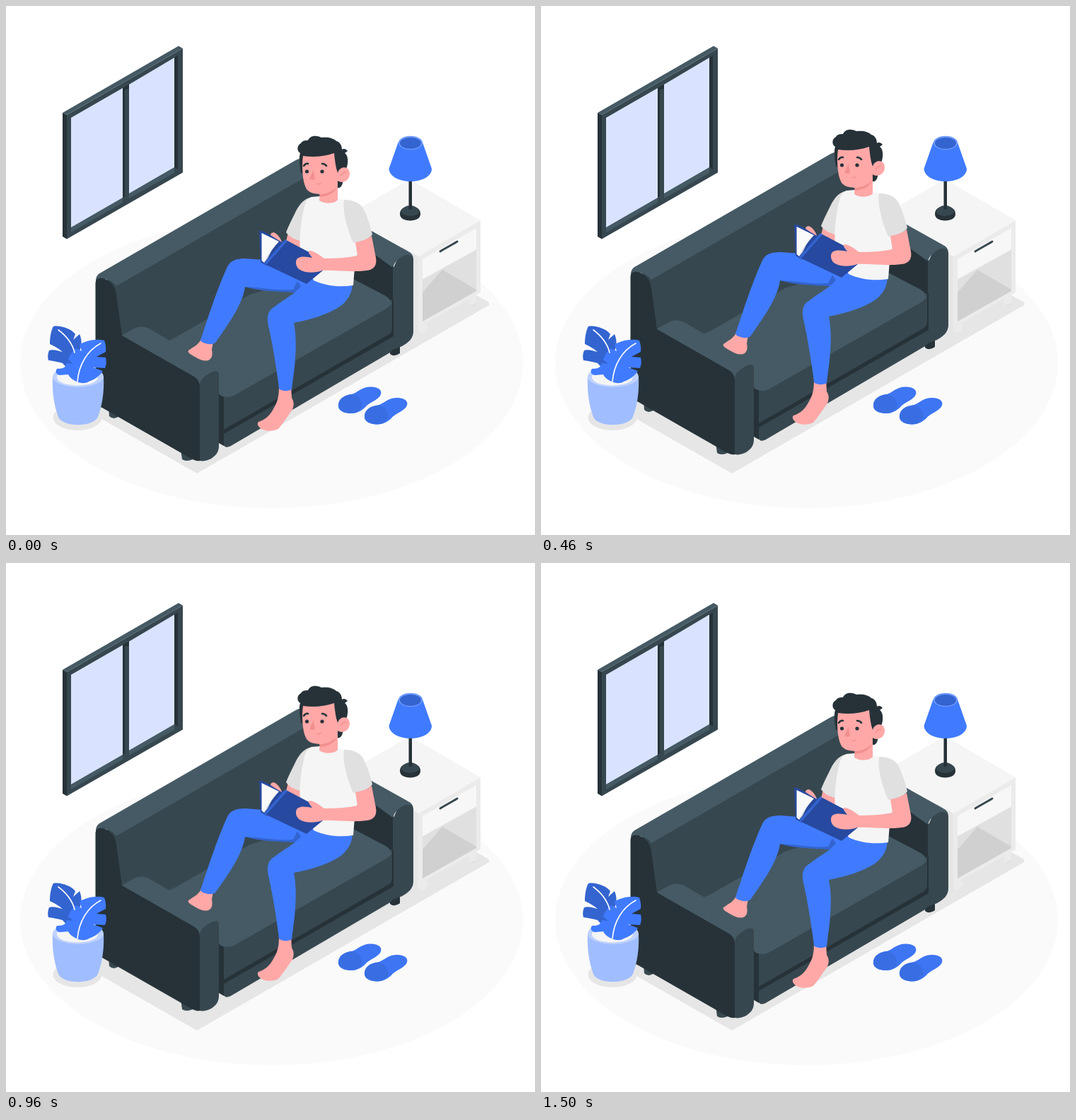
An HTML page for the animation above (1.54 s loop, 748 by 748 pixels).

```html
<!DOCTYPE html>
<html lang="en">
<head>
<meta charset="utf-8">
<title>Reading on the sofa</title>
<style>
  html, body { margin: 0; width: 100%; height: 100%; overflow: hidden; background: #fff; }
  svg { display: block; width: 100%; height: 100%; }
  .k { fill: #263238; } .d { fill: #37474f; } .l { fill: #455a64; }
  .b { fill: #407bff; } .n { fill: #3364d0; } .s { fill: #ffa8a7; }
  .g { fill: #e6e6e6; } .w { fill: #f5f5f5; }
  .line { fill: none; stroke-linecap: round; stroke-linejoin: round; }
</style>
</head>
<body>
<svg viewBox="0 0 748 748">
  <defs>
    <g id="slipper">
      <path fill="#3d75f2" d="M470 564C471 555 479 550 489 549C497 547 502 539 515 538.5C526 538 532 543 530 549C528 556 517 559 510 565C505 571 498 576 488 576C477 576 469 572 470 564Z"/>
      <path fill="#396ee3" d="M470 563C471 555 479 550 489 549C499 551 505 558 503 568C499 573 495 576 488 576C477 576 469 571 470 563Z"/>
    </g>
  </defs>

  <!-- floor and shadows -->
  <ellipse cx="375.5" cy="505" rx="355.5" ry="205" fill="#fafafa"/>
  <path class="g" d="M130 581L270 661L683 423V419L660 406L300 500L130 560Z"/>
  <ellipse class="g" cx="101" cy="582" rx="34.5" ry="18"/>

  <!-- window -->
  <path class="d" d="M86 154L250 60V235.500L86 329.500Z"/>
  <path class="l" d="M80 151L244 56.500L250 60L86 154Z"/>
  <path class="k" d="M80 151L86 154V329.500L80 326Z"/>
  <path class="l" d="M92 312L165 270V278L92 320ZM174 262L238 226V236L174 272Z"/>
  <path fill="#d9e3ff" d="M92 158L165 116V271L92 313ZM174 111L238 73V228L174 265Z"/>
  <path class="k" d="M238 73L243 70V231L238 228ZM165 116L168 114.500V269L165 271ZM168 114L174 111V117L168 118Z"/>

  <!-- nightstand -->
  <path fill="#e0e0e0" d="M655 409H665V422L660 425L655 422Z"/>
  <path class="g" d="M560 335L583 354V463L560 450Z"/>
  <path fill="#ebebeb" d="M583 354L671 303V405L583 455Z"/>
  <path fill="#ebebeb" d="M583 450H596V457L589 463L583 460ZM655 410L665 406V420L655 424Z"/>
  <path class="w" d="M483 296L571 245L671 303L583 354Z"/>
  <path fill="#f7f7f7" d="M589 358L665 314V344L589 386Z"/>
  <path fill="#e0e0e0" d="M589 387L665 345V403L589 446Z"/>
  <path fill="#d0d0d0" d="M617 373L665 401V403L589 446V405Z"/>
  <path class="line" stroke="#37474f" stroke-width="3" d="M614 347C615 346 637 334 638 333"/>

  <!-- lamp -->
  <path class="k" d="M557 294C557 287 563 283 571.500 283C580 283 586 287 586 294C586 300 580 303.500 571.500 303.500C563 303.500 557 300 557 294Z"/>
  <path class="d" d="M559 290C561 285 566 282 571.500 282C577 282 582 285 584 290C585 299 558 299 559 290Z"/>
  <path class="k" d="M569.500 240H574V287Q571.700 289 569.500 287Z"/>
  <path class="b" d="M554.500 193L541.500 230C542 241 556 248 572 248C588 248 602 241 602 230L589 193Z"/>
  <ellipse cx="572" cy="193.500" rx="17.200" ry="9.700" fill="#6f9bff"/>
  <ellipse class="n" cx="572" cy="194" rx="15" ry="8"/>

  <use href="#slipper"/>
  <use href="#slipper" x="37" y="15.500"/>

  <g id="float">
    <!-- sofa feet -->
    <path class="d" d="M145 566H160V580Q152 586 146 580ZM247 626H264V641Q255 645 249 641Z"/>
    <path class="k" d="M542 476H557V491Q549 497 543 492Z"/>

    <!-- backrest -->
    <path class="d" d="M140 389L425 226L462 240V400L232 474L160 470Z"/>
    <path class="l" d="M127 389C127 382 130 379 135 376.500L408 219C414 215 422 214 428 217L462 241H425L156 396C150 387 138 383 127 389Z"/>

    <!-- right arm -->
    <path class="k" d="M455 380L515 322L548 350V482L470 450Z"/>
    <path class="d" d="M547 486V372L556 352L570 348C574 350 576 354 576 359V460C576 470 569 476 560 481Z"/>
    <path class="l" d="M490 336L515 317L567 346C571 348 574 351 575 354C569 350 564 352 559 355C553 359 549 363 547 370L518 349L500 355Z"/>

    <!-- seat -->
    <path class="k" d="M301 540L548 415V478L308 622L301 618Z"/>
    <path class="d" d="M308 605L548 467V483Q547 487 543 490L318 622C312 625 308 624 308 619Z"/>
    <path class="d" d="M308 552L400 480L546 415V455Q546 461 542 464L308 599Z"/>
    <path class="l" d="M230 473L345 407L440 372L493 387L535 409C542 413 545 417 545 421Q542 426 534 430L322 551C312 555 303 552 301 548L296 512Z"/>
    <path class="d" d="M232 473L337 398H400L262 477L250 483Z"/>
    <path class="l" d="M232 473L345 408L420 385L420 430L290 520Z"/>

    <!-- left arm -->
    <path class="l" d="M163 466L181 456C189 452 197 453 204 457L296 511C300 513 302 517 301 521L276 540Z"/>
    <path class="k" d="M126.500 562V392C127 384 134 383 142 387C152 392 155 400 156 408L164 466L264 523C270 526 274 531 274 538V643C270 644 265 642 260 639L136 568C129 566 126.500 565 126.500 562Z"/>
    <path class="d" d="M274 643V536C274 529 280 524 288 519C296 515 301 515 301 521V622C301 631 296 637 288 641C283 643 278 644 274 643Z"/>

    <!-- far leg -->
    <path class="s" d="M276 470C274 478 265 482 258 487C256 490 262 493 267 496C275 501 284 504 289 499C292 496 292 491 291 486L293 474Z"/>
    <path class="b" d="M275 473C283 448 299 399 312 371C316 360 325 357 338 357L365 359L440 382V402C430 407 415 406 400 404C380 401 355 402 338 397C335 417 324 437 296 476C292 480 279 478 275 473Z"/>
    <path class="n" d="M338 397C362 398 386 403 406 401L412 389L418 398L408 405C385 404 357 403 338 397Z"/>

    <!-- near leg -->
    <path class="s" d="M386 537C386 549 385 558 379 568C374 578 367 585 357 588C354 591 357 596 363 599C371 602 379 601 385 598C393 589 400 577 405 571C407 565 408 561 404 554L403 537Z"/>
    <path class="b" d="M386 541C382 509 377 479 371 452C368 438 371 430 380 425C390 417 404 409 412 402L432 380L490 390C490 403 486 412 477 421C462 434 433 443 407 448C411 467 410 491 408 510L404 542C400 545 389 545 386 541Z"/>

    <!-- far arm and torso -->
    <path class="s" d="M399 320L420 328V347L396 333Z"/>
    <path fill="#e0e0e0" d="M436 270C423 270 415 280 410 290C404 302 399 312 396 320C401 327 410 331 419 333L430 300Z"/>
    <path class="w" d="M432 270L444 269Q456 276 469 272L486 276C500 310 502 338 493 370L491 395C472 398 452 396 435 388L416 345C414 322 419 294 423 280Q426 272 432 270Z"/>
    <path fill="#e0e0e0" d="M478 274C494 274 503 280 507 290C512 301 516 314 518 323C513 330 502 334 491 335C484 319 475 291 478 274Z"/>

    <!-- book -->
    <path fill="#27499f" d="M358 318L362 318L397 335L368 367L360 362Z"/>
    <path class="s" d="M374 324C374 320 379 319 382 322C386 325 389 330 390 334L380 328Z"/>
    <path fill="#fafafa" d="M361.500 321L386 333C378 341 371 352 365 363L361.500 360Z"/>
    <path fill="#e0e0e0" d="M386 333C379 340 371 352 365 363L370 357L378 341Z"/>
    <path class="n" d="M365 364L395 330L399 333L369 368Z"/>
    <path fill="#27499f" d="M368 366L398 332L436 352L448 374L425 393Z"/>

    <!-- near arm -->
    <path class="s" d="M494 334C503 333 512 329 517 325L523 356C525 367 520 373 510 374C488 377 466 373 447 374C437 378 423 378 414 372C409 367 409 360 412 357C418 353 426 355 433 356C430 352 426 348 429 346C436 346 444 353 450 357C466 357 482 356 497 353Z"/>

    <!-- head -->
    <path class="k" d="M417 236C415 225 414 214 416 208C411 205 411 197 417 194C419 190 424 190 427 190C430 183 438 182 446 186C456 185 463 187 467 191C472 192 475 197 475 203C477 201 481 202 483 205L479 208C485 212 484 225 480 233L476 250C475 255 472 258 469 257L450 250Z"/>
    <path class="s" d="M444 255L469 245V274C465 280 449 280 443 275Z"/>
    <path fill="#f28f8f" d="M444 266C455 265 463 261 468 256C465 264 456 269 444 270Z"/>
    <path class="s" d="M420 212C434 214 450 213 464 208C465 218 466 228 469 236C471 229 477 227 482 229C488 233 487 243 481 247C476 250 471 249 469 247C467 259 459 264 447 266C436 266 427 264 424 257C419 247 418 226 420 212Z"/>
    <path class="line" stroke="#f28f8f" stroke-width="1.300" d="M435 233C433 237 431 241 430 244Q433 246 436 244M440 251Q443 253 445 250M473 240Q476 235 481 235"/>
    <path fill="#f28f8f" d="M435 234L430 244Q434 247 437 244Z"/>
    <path class="line" stroke="#263238" stroke-width="2.500" d="M421 226Q424 222 427 223M447 223Q451 223 453 226"/>
    <circle class="k" cx="425.500" cy="234" r="2.600"/>
    <circle class="k" cx="447" cy="234" r="2.600"/>
  </g>

  <!-- plant -->
  <path fill="#a0bdff" d="M66 524C65 546 68 565 74 581C80 596 123 596 130 581C136 565 139 546 138 524Z"/>
  <ellipse cx="102" cy="524" rx="36" ry="15" fill="#bfd2ff"/>
  <ellipse cx="101" cy="525" rx="29" ry="11.500" fill="#f5f5f5"/>
  <path class="n" d="M67 453C77 451 93 457 98 464L95 472L104 464C108 473 107 482 103 490L98 525L80 505C74 503 67 502 60 501Q58 494 61 487C67 485 74 488 80 489C73 483 66 480 62 478C62 468 64 458 67 453Z"/>
  <path class="b" d="M139 473C129 470 112 473 104 479L107 488L99 484C93 489 90 494 88 500L95 506L86 505C84 510 83 513 72 513C69 517 71 521 76 522L88 521C92 530 109 537 117 531C124 529 133 523 137 516L123 511L140 512Q143 505 141 497L128 496L141 489Q142 481 139 473Z"/>
  <path class="line" stroke="#fff" stroke-width="1.600" d="M74 458C86 467 94 478 97 490M134 477C115 487 103 507 101 531"/>
</svg>
<script>
  const LOOP = 1540;
  // [ms, lift in px]
  const steps = [
    [0, 0], [40, .5], [330, 6.4], [540, 10.6], [630, 12.6], [735, 14],
    [830, 12.9], [1080, 7.3], [1330, 2.5], [1500, 0], [LOOP, 0]
  ];
  document.getElementById('float').animate(
    steps.map(([t, y]) => ({ offset: t / LOOP, transform: `translateY(${-y}px)` })),
    { duration: LOOP, iterations: Infinity }
  );
</script>
</body>
</html>
```
